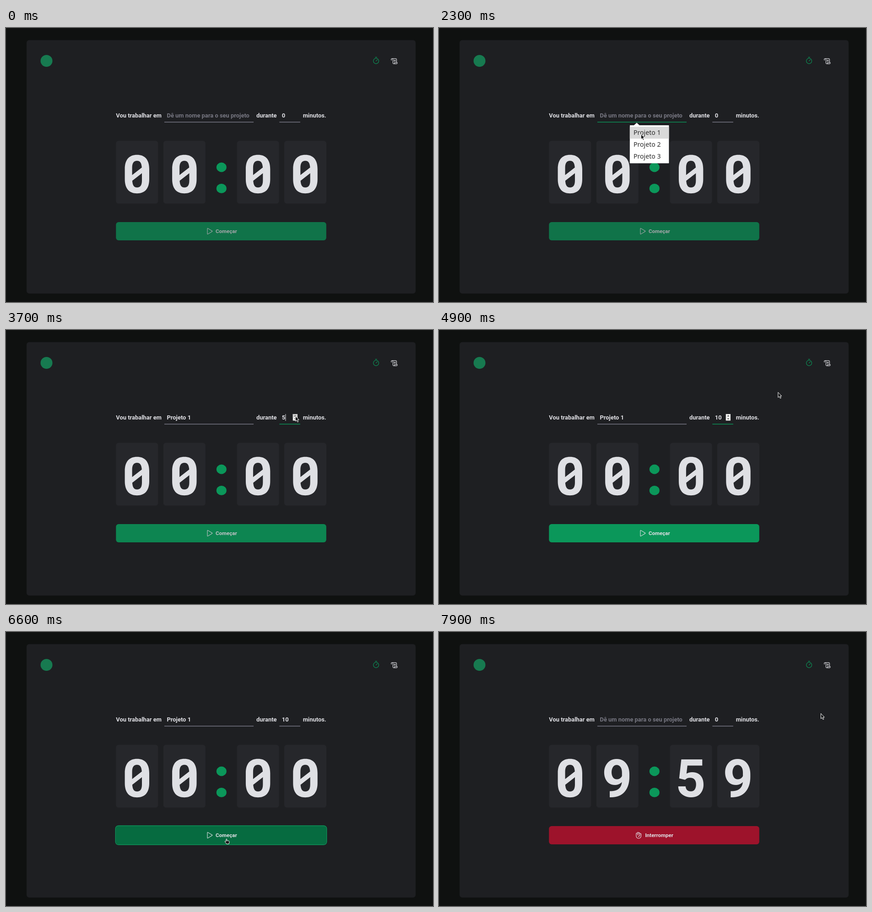
An HTML page that plays this animation: 933 by 600 pixels, repeating every 8 s.

```html
<!DOCTYPE html>
<html lang="pt-BR">
<head>
<meta charset="utf-8">
<title>Timer</title>
<style>
  html, body { margin: 0; width: 100%; height: 100%; overflow: hidden; background: #0f1110; }
  #stage { display: block; width: 100vw; height: 100vh; font: 700 12.92px Roboto, sans-serif; fill: #e1e1e6; }
  .icon { fill: none; stroke: #e1e1e6; stroke-width: 16; stroke-linecap: round; stroke-linejoin: round; }
  .action { font-size: 11.49px; }
  .digit { font-size: 115px; text-anchor: middle; fill: #dfe0e4; }
  .card { fill: #26272b; }
  .green { fill: #0b975a; }
  .menu { font: 400 14.1px "Noto Sans", sans-serif; fill: #2b2b2b; }
  .caret { fill: #e1e1e6; }
</style>
</head>
<body>
<svg id="stage" viewBox="0 0 933 600">
  <rect x="45" y="26.5" width="850" height="555" rx="5.7" fill="#1e1f22"/>
  <circle cx="88.5" cy="72" r="13" fill="#177a50"/>

  <svg class="icon" x="800" y="63.6" width="17.2" height="17.2" viewBox="0 0 256 256" overflow="visible" style="stroke:#0b975a">
    <circle cx="128" cy="128" r="88"/><path d="M128 128l39.6-39.6M104 8h48"/>
  </svg>
  <svg class="icon" x="840" y="63.6" width="17.2" height="17.2" viewBox="0 0 256 256">
    <path d="M38 104C28 98 24 90 24 80a28 28 0 0 1 56 0V192a28 28 0 0 0 56 0c0-10-8-16-8-16H216s8 6 8 16a28 28 0 0 1-28 28H108M52 52H172a28 28 0 0 1 28 28V176M112 104h56M112 136h56"/>
  </svg>

  <text x="240.3" y="196.4">Vou trabalhar em</text>
  <text x="547" y="196.4">durante</text>
  <text x="699.6" y="196.4" text-anchor="end">minutos.</text>
  <text id="project" x="351.5" y="195.9"></text>
  <text id="minutes" x="602.8" y="195.9"></text>
  <rect id="projectLine" x="346" y="205.4" width="195" height="1.4"/>
  <rect id="minutesLine" x="597.3" y="205.4" width="45.6" height="1.4"/>
  <rect id="caret" class="caret" y="184" width="1" height="15"/>
  <g id="spinner">
    <rect x="626.7" y="184" width="10.3" height="14.4" fill="#efefef"/>
    <rect id="spinUp" x="626.7" y="184" width="10.3" height="7.2" fill="#cfcfcf"/>
    <path d="M629.6 189.2l2.3-2.6 2.3 2.6zM629.6 193.4l2.3 2.6 2.3-2.6z" fill="#3c3c3c"/>
  </g>

  <g id="clock"></g>
  <g class="green">
    <ellipse cx="470.8" cy="305" rx="11" ry="10.4"/>
    <ellipse cx="470.8" cy="351.4" rx="11" ry="10.4"/>
  </g>

  <g id="button" class="action">
    <rect id="buttonFill" x="240.3" y="425" width="459.5" height="40" rx="5.7"/>
    <rect id="outline" x="239.4" y="424.2" width="461.2" height="41.6" rx="6.4" fill="none" stroke="#0b975a" stroke-width="1.5"/>
    <g id="start">
      <svg class="icon" x="435.2" y="436.4" width="17.2" height="17.2" viewBox="0 0 256 256">
        <path d="M72 39.9V216.1a8 8 0 0 0 12.2 6.8l144-88.1a8 8 0 0 0 0-13.6L84.2 33.1A8 8 0 0 0 72 39.9z"/>
      </svg>
      <text x="458.1" y="448.7">Começar</text>
    </g>
    <g id="stop">
      <svg class="icon" x="427.6" y="436.4" width="17.2" height="17.2" viewBox="0 0 256 256">
        <path d="M168 104V92a20 20 0 0 1 40 0v60a80 80 0 0 1-160 0V76a20 20 0 0 1 40 0v44V52a20 20 0 0 1 40 0v60V68a20 20 0 0 1 40 0v76a40 40 0 0 0-40 40"/>
      </svg>
      <text x="450.5" y="448.7">Interromper</text>
    </g>
  </g>

  <g id="menu" class="menu">
    <path d="M417 213h9l6-5.5 6 5.5h64a.8.8 0 0 1 .4.8v81.7a.8.8 0 0 1-.8.8h-84a.8.8 0 0 1-.8-.8z" fill="#fff"/>
    <rect id="menuHover" x="416.8" y="216.3" width="85.6" height="26" fill="#d9d9d9"/>
    <text x="425" y="234">Projeto 1</text>
    <text x="425" y="260">Projeto 2</text>
    <text x="425" y="286">Projeto 3</text>
  </g>

  <g id="pointer" stroke-linejoin="round" fill="#101112" stroke="#fff">
    <path id="arrow" d="M.4.4V11.8l2.6-2.3 2 4.2 1.9-.9-2-4.1h3.3z"/>
    <path id="beam" d="M-2.5-6H-.8L0-5.2.8-6H2.5M0-5.2V5.2M-2.5 6H-.8L0 5.2.8 6H2.5" fill="none"/>
    <path id="hand" d="M-.5.8v5L-2 5c-1.2-.4-1.7.6-1 1.4L.4 11h5.1l1-4.3c.2-1.5-.2-2.1-1.1-2.2L1.2 4V.8C1.2-.4-.5-.4-.5.8z"/>
  </g>
</svg>

<script>
const LOOP = 8000, STEP = 100, BLINK = 600;
const $ = id => document.getElementById(id);
const show = (id, on) => $(id).setAttribute('visibility', on ? 'inherit' : 'hidden');
const set = (id, name, value) => $(id).setAttribute(name, value);

const PLACEHOLDER = 'Dê um nome para o seu projeto';
const GREEN = '#0b975a', GREY = '#7c7c8a';
const ZERO = 'M-26.7 309C-26.7 287.5-16.5 277.8 0 277.8S26.7 287.5 26.7 309V331C26.7 352.5 16.5 362.2 0 362.2S-26.7 352.5-26.7 331Z' +
  'M-10.7 322V306C-10.7 295.5-7 290.8 0 290.8C6 290.8 9.7 294.5 10.5 305.5Z' +
  'M-10.4 334.5L10.7 318V334C10.7 344.5 7 349.2 0 349.2C-6 349.2-9.7 345.5-10.4 334.5Z';

// Each table row holds from its time until the next one.
const projects = [[0, ''], [2600, 'Projeto 1'], [6800, '']];
const minutes = [[0, '0'], [3700, '5'], [4100, '10'], [6800, '0']];
const clocks = [[0, '0000'], [6800, '1000'], [7800, '0959']];
const carets = [[0, 0], [1400, 352], [2600, 404.2], [3700, 610.4], [4100, 617.2], [6600, 0]];
const fills = [[0, GREEN], [5800, '#09814d'], [5900, GREEN], [6500, '#09814d'],
  [6600, '#066b40'], [6800, '#6e0d1e'], [7500, '#9d132b']];
const opacities = [[0, .7], [3700, .85], [3800, 1]];

// Pointer path: time, x, y of the hot spot.
const path = [
  [500, 148, 6], [700, 235, 75], [900, 330, 145], [1200, 406.5, 194],
  [1900, 406.5, 194], [2000, 411, 200], [2300, 441, 232],
  [2600, 441, 232], [2700, 500, 219], [2800, 553, 206.5], [3000, 598, 200], [3400, 625, 194],
  [3500, 632, 188], [4600, 632, 188], [4700, 650, 178], [4900, 740.5, 136],
  [5100, 777, 113], [5300, 764, 152], [5500, 690, 266], [5700, 548, 400], [5800, 492, 446],
  [5900, 476.3, 470], [6200, 476.3, 470], [6300, 481.5, 453],
  [7300, 481.5, 453], [7400, 502, 443], [7500, 552, 408], [7900, 834, 178]
];

const rowAt = (table, t) => table.findLast(row => row[0] <= t);
const valueAt = (table, t) => rowAt(table, t)[1];
const within = (t, from, to) => t >= from && t < to;

function pointerAt(t) {
  const a = rowAt(path, t);
  const b = path[path.indexOf(a) + 1] || a;
  const k = a === b ? 0 : (t - a[0]) / (b[0] - a[0]);
  return [a[1] + (b[1] - a[1]) * k, a[2] + (b[2] - a[2]) * k];
}

function pointerKind(x, y, t) {
  const overProject = within(x, 346, 541) && within(y, 178, 206);
  const overMinutes = within(x, 597, 627) && within(y, 178, 206);
  const menuOpen = within(t, 1400, 2600);
  if (overProject || overMinutes) return menuOpen && y > 208 ? 'arrow' : 'beam';
  return within(x, 240, 700) && within(y, 425, 465) ? 'hand' : 'arrow';
}

const cards = [240.3, 343.8, 504.6, 608];
$('clock').innerHTML = cards.map(x => `
  <g transform="translate(${x + 46})">
    <rect class="card" x="-46" y="247" width="92" height="137.6" rx="5.7"/>
    <path class="digit" fill-rule="evenodd" d="${ZERO}"/>
    <text class="digit" x="-.8" y="361"></text>
  </g>`).join('');
const slots = [...$('clock').children];

function drawClock(digits) {
  slots.forEach((slot, i) => {
    const zero = digits[i] === '0';
    slot.querySelector('path').setAttribute('visibility', zero ? 'visible' : 'hidden');
    slot.querySelector('text').textContent = zero ? '' : digits[i];
  });
}

function draw(t) {
  const project = valueAt(projects, t);
  $('project').textContent = project || PLACEHOLDER;
  set('project', 'fill', project ? '#e1e1e6' : '#777782');
  $('minutes').textContent = valueAt(minutes, t);
  set('projectLine', 'fill', within(t, 1400, 3700) ? GREEN : GREY);
  set('minutesLine', 'fill', within(t, 3700, 6600) ? GREEN : GREY);

  const [since, caretX] = rowAt(carets, t);
  // The caret restarts its blink whenever focus or value changes.
  show('caret', caretX && Math.floor((t - since) / BLINK) % 2 === 0 || within(t, 5900, 6000));
  set('caret', 'x', caretX);

  show('spinner', within(t, 3300, 6600));
  show('spinUp', within(t, 3700, 4500));
  show('menu', within(t, 1400, 2600));
  show('menuHover', within(t, 2200, 2600));

  drawClock(valueAt(clocks, t));
  set('button', 'opacity', valueAt(opacities, t));
  set('buttonFill', 'fill', valueAt(fills, t));
  show('outline', within(t, 6600, 6800));
  show('start', t < 6800);
  show('stop', t >= 6800);

  show('pointer', t >= 500);
  if (t < 500) return;
  const [x, y] = pointerAt(t);
  const kind = pointerKind(x, y, t);
  set('pointer', 'transform', `translate(${x} ${y})`);
  for (const id of ['arrow', 'beam', 'hand']) show(id, id === kind);
}

const begin = performance.now();
function tick() {
  const t = (performance.now() - begin) % LOOP;
  draw(Math.floor(t / STEP) * STEP);
  requestAnimationFrame(tick);
}
tick();
</script>
</body>
</html>
```
